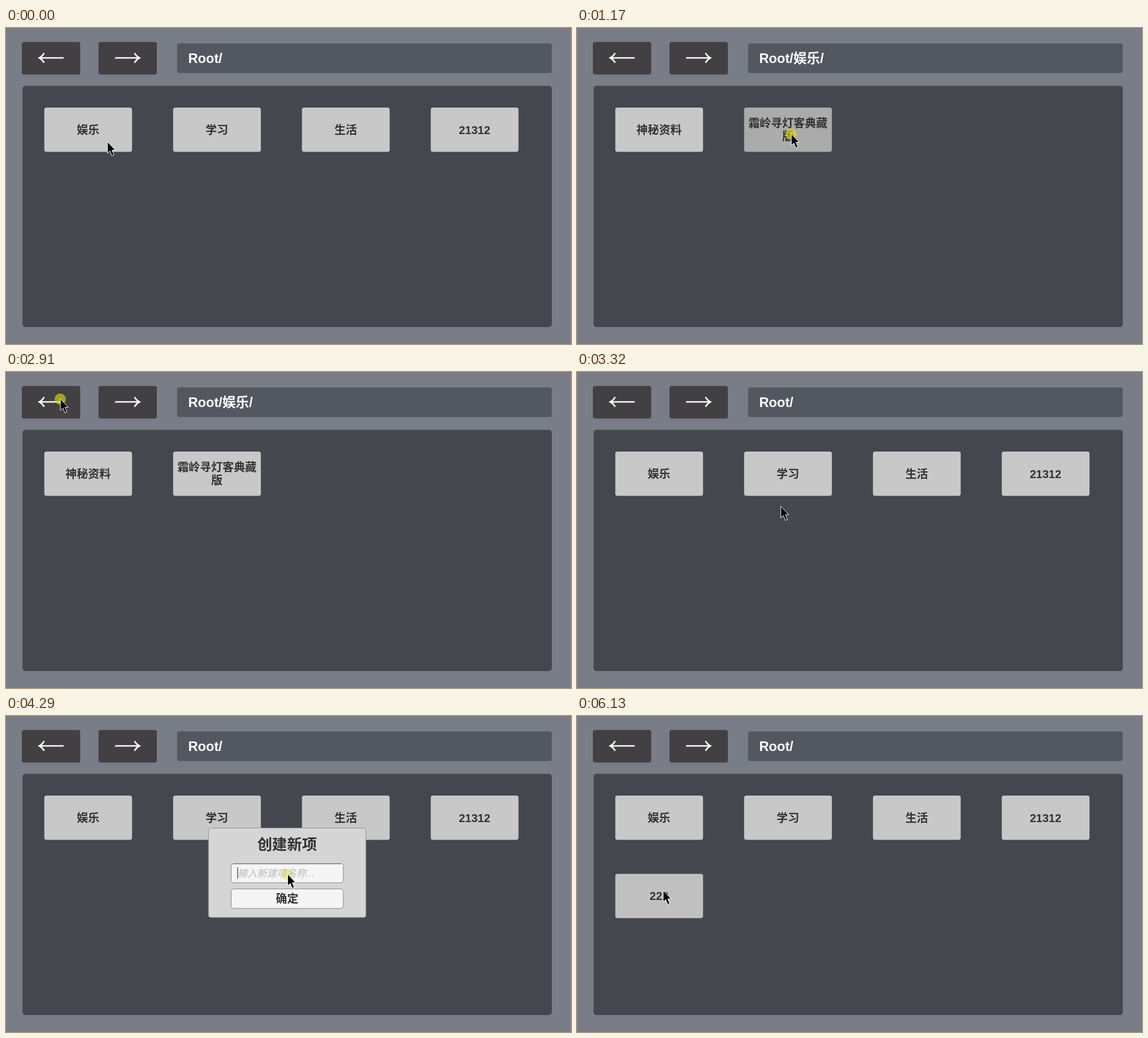
These frames come from a looping animation (1000x560 px, 6.2 s). An HTML page:

```html
<!DOCTYPE html>
<html lang="zh-CN">
<head>
<meta charset="utf-8">
<title>Folder browser</title>
<style>
  html, body { margin: 0; width: 100%; height: 100%; overflow: hidden; background: #797d87; }
  svg { display: block; width: 100%; height: 100%; }
  text { font-family: "Liberation Sans", "Noto Sans CJK SC", "Noto Sans CJK", sans-serif; font-weight: 700; fill: #323232; white-space: pre; }
  .mid { text-anchor: middle; }
  .hint { font-weight: 400; font-style: italic; fill: #b9b9b9; }
</style>
</head>
<body>
<svg viewBox="0 0 1000 560">
  <defs>
    <g id="button">
      <rect x="28" y="24.8" width="103.3" height="57.7" rx="4" fill="#424042"/>
      <path d="M102 53H60M67.5 44.3Q64.5 50 58.8 53Q64.5 56 67.5 61.7" fill="none" stroke="#fff" stroke-width="2.6"/>
    </g>
  </defs>
  <rect width="1000" height="560" fill="#797d87"/>
  <use href="#button"/>
  <use href="#button" transform="translate(295) scale(-1 1)"/>
  <rect x="302.8" y="27.3" width="663.2" height="52.5" rx="4" fill="#53575f"/>
  <text id="path" x="322.5" y="62" font-size="23.65" style="fill:#fff"></text>
  <rect x="29.3" y="102.5" width="936.7" height="427.5" rx="5" fill="#45474f"/>
  <g id="cards"></g>
  <g id="dialog">
    <rect x="358.3" y="198.5" width="278.7" height="158.5" rx="4" fill="#d5d5d5" stroke="#909090"/>
    <text class="mid" x="497.5" y="236.5" font-size="26.4">创建新项</text>
    <rect id="field" x="398.5" y="261.5" width="198.5" height="34" rx="5" stroke="#858585"/>
    <path d="M402 262H593" stroke="#6c6c6c"/>
    <text id="hint" class="hint" x="409.5" y="284.5" font-size="17.4">输入新建项名称...</text>
    <text id="typed" x="409.5" y="284" font-size="17.2"></text>
    <rect id="caret" y="268" width="1.2" height="20" fill="#323232"/>
    <rect x="398.5" y="306.5" width="198.5" height="34.5" rx="5" fill="#f5f5f5" stroke="#858585"/>
    <text class="mid" x="497.5" y="331" font-size="20">确定</text>
  </g>
  <circle id="ring" r="10" fill="#dcd714"/>
  <path id="cursor" d="M0 0V20.5L4.6 16.5L8 25L11.6 23.4L8.2 15H14Z" fill="#000" stroke="#fff"/>
</svg>
<script>
const LOOP = 6200, STEP = LOOP / 90;
const HOLD = 140, FADE = 70, BLINK = 550, KEY = 70;
const OPEN = 3530, FOCUS = 4130, TYPE = 4950, CONFIRM = 5290;
const $ = id => document.getElementById(id);

const root = { path: "Root/", items: ["娱乐", "学习", "生活", "21312"] };
const grown = { path: root.path, items: [...root.items, "222"] };
const enter = (dir, i, items) => ({ path: dir.path + dir.items[i] + "/", items });
const fun = enter(root, 0, ["神秘资料", "霜岭寻灯客典藏版"]);
const game = enter(fun, 1, ["93版雾川谣全集"]);
const leaf = enter(game, 0, []);

// A click opens its folder on release; card is the one pressed
const clicks = [
  { at: 340, card: 0, opens: fun },
  { at: 1095, card: 1, opens: game },
  { at: 1655, card: 0, opens: leaf },
  { at: 2275, opens: game },
  { at: 2550, opens: fun },
  { at: 2830, opens: root },
  { at: FOCUS },
  { at: CONFIRM, opens: grown }
];

// Pointer moves between rests; sag bends a move downwards
const moves = [
  { from: 0, to: 138, x: 179.5, y: 190, sag: 0 },
  { from: 540, to: 1035, x: 379.3, y: 187.5, sag: 47 },
  { from: 1310, to: 1655, x: 130, y: 186, sag: 24 },
  { from: 1860, to: 2275, x: 96.2, y: 47.5, sag: 8 },
  { from: 2970, to: 3190, x: 301, y: 228, sag: 8 },
  { from: 3190, to: 3450, x: 434, y: 250, sag: 0 },
  { from: 3860, to: FOCUS, x: 498.5, y: 280.3, sag: 0 },
  { from: 5140, to: CONFIRM, x: 497.5, y: 316, sag: 0 },
  { from: CONFIRM + HOLD, to: 5640, x: 554, y: 344, sag: 0 },
  { from: 5640, to: 6130, x: 152.5, y: 309, sag: 20 }
];

const clamp = (v, lo, hi) => Math.min(hi, Math.max(lo, v));
const show = (id, on) => $(id).setAttribute("visibility", on ? "visible" : "hidden");

function pointerAt(t) {
  let x = 179.5, y = 201.5;
  for (const m of moves) {
    const k = clamp((t - m.from) / (m.to - m.from), 0, 1);
    x += (m.x - x) * k;
    y += (m.y - y) * k + m.sag * 4 * k * (1 - k);
  }
  return [x, y];
}

function card(label, i, pressed) {
  const x = 67.8 + i % 4 * 228, y = 141 + Math.floor(i / 4) * 138.7;
  const fill = pressed ? "#ababab" : i > 3 ? "#c0c0c0" : "#c8c8c8";
  const wraps = label.replace(/\d\d/g, "0").length > 7;
  const lines = wraps ? [label.slice(0, 7), label.slice(7)] : [label];
  const top = y + 46.5 - (lines.length - 1) * 11.2;
  const text = lines.map((s, n) =>
    `<text class="mid" x="${x + 77.5}" y="${top + n * 22.5}" font-size="20">${s}</text>`);
  return `<rect x="${x}" y="${y}" width="155.3" height="78.5" rx="4" fill="${fill}"/>` + text.join("");
}

let lastCards = "";
function drawFolder(t) {
  const done = clicks.filter(c => c.opens && t >= c.at + HOLD).pop();
  const folder = done ? done.opens : root;
  const press = clicks.find(c => t >= c.at && t < c.at + HOLD);
  const html = folder.items.map((s, i) => card(s, i, press && press.card === i)).join("");
  if (html !== lastCards) $("cards").innerHTML = lastCards = html;
  $("path").textContent = folder.path;
}

function drawDialog(t) {
  const open = t >= OPEN && t < CONFIRM + HOLD;
  const count = clamp(Math.floor((t - TYPE) / KEY) + 1, 0, 3);
  const lastKey = count ? TYPE + (count - 1) * KEY : FOCUS;
  const pressed = t >= FOCUS && t < FOCUS + FADE;
  $("dialog").style.display = open ? "" : "none";
  $("field").setAttribute("fill", pressed ? "#c8c8c8" : t < FOCUS - HOLD ? "#fff" : "#f5f5f5");
  show("hint", open && !count);
  $("typed").textContent = "2".repeat(count);
  $("caret").setAttribute("x", 409.3 + count * 9.57);
  show("caret", open && t >= FOCUS && Math.floor((t - lastKey) / BLINK) % 2 === 0);
}

function drawPointer(t) {
  const [x, y] = pointerAt(t);
  $("cursor").setAttribute("transform", `translate(${x} ${y})`);
  show("cursor", t < 4540 || t >= 5140);
  const click = clicks.find(c => t >= c.at && t < c.at + HOLD + FADE);
  show("ring", click);
  if (!click) return;
  $("ring").setAttribute("cx", x - 0.3);
  $("ring").setAttribute("cy", y + 0.5);
  $("ring").setAttribute("opacity", t < click.at + HOLD ? 0.65 : 0.35);
}

function render(ms) {
  const t = Math.floor(ms % LOOP / STEP + 0.1) % 90 * STEP;
  drawFolder(t);
  drawDialog(t);
  drawPointer(t);
}

const start = performance.now();
function tick() {
  render(performance.now() - start);
  requestAnimationFrame(tick);
}
tick();
</script>
</body>
</html>
```
